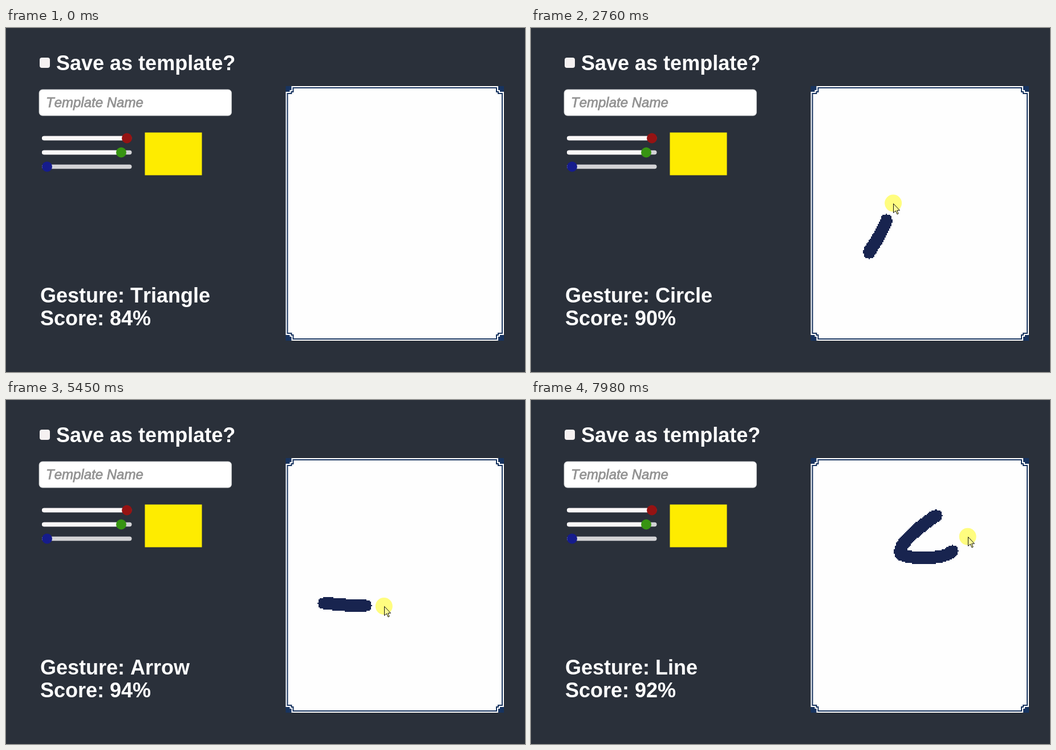
Write an HTML page with a canvas that moves like this. It is 910x604 px and loops after 8 s.

```html
<!DOCTYPE html>
<html lang="en">
<head>
<meta charset="utf-8">
<title>Gesture recognizer</title>
<style>
  html, body { margin: 0; width: 100%; height: 100%; overflow: hidden; background: #2a303a; }
  svg, canvas { position: absolute; left: 0; top: 0; }
  text { font: bold 36px "Liberation Sans", Arial, sans-serif; font-kerning: none; fill: #fff; }
  text.hint { font: italic 24px "Liberation Sans", Arial, sans-serif; font-kerning: none;
    fill: #929292; stroke: #929292; stroke-width: .8; }
</style>
</head>
<body>
<svg id="ui" width="910" height="604">
  <rect x="59" y="52" width="18" height="18" rx="4" fill="#f5f1f1"/>
  <text x="88" y="74">Save as template?</text>
  <rect x="58" y="108" width="337.5" height="46" rx="6" fill="#fff" stroke="#b9bbbe" stroke-width=".8"/>
  <text class="hint" x="70" y="139">Template Name</text>
  <rect x="243.5" y="183.5" width="100" height="75" fill="#feec00"/>
  <text id="gesture" x="60" y="482"></text>
  <text id="score" x="60" y="522"></text>
</svg>
<canvas id="pad" width="910" height="604"></canvas>
<script>
const LOOP = 8000, LAG = 40, TEXEL = 2, RADIUS = 5;
const NAVY = '#17335f', INK = [24, 36, 79];
const ui = document.getElementById('ui');
const ctx = document.getElementById('pad').getContext('2d');
const gestureText = document.getElementById('gesture');
const scoreText = document.getElementById('score');

function svgNode(tag, attrs) {
  const el = document.createElementNS(ui.namespaceURI, tag);
  for (const [k, v] of Object.entries(attrs)) el.setAttribute(k, v);
  return el;
}

function addRect(x, y, width, height, fill, rx = 0) {
  ui.append(svgNode('rect', { x, y, width, height, fill, rx }));
}

// Colour sliders
[[212, '#951313'], [202, '#379412'], [72, '#161c8c']].forEach(([x, color], i) => {
  const y = 193.5 + 25 * i;
  addRect(63, y - 3.7, 157.5, 7.4, '#d2d2d5', 3.7);
  addRect(63, y - 3.7, x - 63, 7.4, '#fbf8f8', 3.7);
  addRect(x - 9, y - 9, 18, 18, color, 9);
});

// Panel with notched corners: nested outlines, each inset by d
addRect(490.5, 102, 382.5, 447, NAVY);
[[0, '#fff'], [2, NAVY], [4, '#fefefe']].forEach(([d, color]) => {
  for (const [dx, dy] of [[0, 10], [7, 7], [10, 0]]) {
    addRect(490.5 + dx + d, 102 + dy + d, 382.5 - 2 * (dx + d), 447 - 2 * (dy + d), color);
  }
});

// A cursor run along an SVG path, kept as one point per pixel of length
function run(start, end, d, extra) {
  const path = svgNode('path', { d });
  const points = Array.from({ length: Math.floor(path.getTotalLength()) + 1 }, (_, i) => {
    const { x, y } = path.getPointAtLength(i);
    return [x, y];
  });
  return { start, end, points, ...extra };
}

const strokes = [
  run(770, 1460, 'M632 257Q557 300 517 380Q530 395 545 407L660 485Q700 512 740 512' +
    'C800 512 845 450 845 393C845 310 740 222 632 220Q620 220 614 234',
    { name: 'Circle', score: 90, color: [128, 98, 0], release: 1614 }),
  run(2560, 3340, 'M592 394Q624 350 642 285Q655 245 683 184Q722 240 729 272Q739 320 741 382H591',
    { name: 'Triangle', score: 83, color: [32, 192, 0], release: 3580 }),
  run(4080, 4650, 'M606 399L632 332L647 283Q658 222 672 217Q678 217 698 285L712 340L726 386',
    { name: 'Arrow', score: 94, color: [213, 237, 0], release: 4880 }),
  run(5260, 5620, 'M557 356Q600 362 652 362H752',
    { name: 'Line', score: 92, color: [0, 42, 117], release: 5850 }),
  run(7620, 8340, 'M710 203Q650 245 647 266Q647 277 690 277Q722 277 735 268' +
    'Q755 255 767 238Q840 130 640 140', { release: Infinity })
];

const runs = [
  ...strokes,
  run(110, 680, 'M868 554L632 257'),
  run(1790, 2150, 'M614 234L592 394'),
  run(3570, 3720, 'M591 382L629 407L606 399'),
  run(4880, 5220, 'M726 386Q800 370 557 356'),
  run(5860, 6110, 'M752 362L557 433L577 420'),
  run(6690, 7260, 'M577 420C660 330 850 100 710 203')
].sort((a, b) => a.start - b.start);

// How many points of a run are passed at time t
function passed(r, t) {
  const u = Math.min(1, Math.max(0, (t - r.start) / (r.end - r.start)));
  return Math.round((r.points.length - 1) * u * u * (3 - 2 * u));
}

function stamp([x, y]) {
  const cx = Math.floor(x / TEXEL), cy = Math.floor(y / TEXEL);
  for (let dy = -RADIUS; dy <= RADIUS; dy++) {
    const half = Math.floor(Math.sqrt(RADIUS * RADIUS - dy * dy));
    ctx.fillRect((cx - half) * TEXEL, (cy + dy) * TEXEL, (2 * half + 1) * TEXEL, TEXEL);
  }
}

// Ink while drawing; once recognized, the stroke's own colour fading to white
function drawStroke(s, t) {
  const age = t - s.release;
  const alpha = age < 0 ? 1 : 0.94 - age * 0.00243;
  if (t < s.start + LAG || alpha <= 0) return;
  const mix = (age < 0 ? INK : s.color).map(c => Math.round(254 + (c - 254) * alpha));
  ctx.fillStyle = `rgb(${mix})`;
  s.points.slice(0, passed(s, t - LAG) + 1).forEach(stamp);
}

const arrow = new Path2D('M.5 .5V16.5L4.3 13 7 19 9.2 18 6.7 12.2H11.5Z');

function drawCursor(t) {
  const current = runs.filter(r => t >= r.start).pop();
  if (!current) return;
  const [x, y] = current.points[passed(current, t)];
  const pressed = strokes.some(s => t >= s.start && t < s.release);
  if (pressed) {
    ctx.fillStyle = 'rgba(255,252,0,.5)';
    ctx.beginPath();
    ctx.arc(x, y, 15, 0, 7);
    ctx.fill();
  }
  ctx.save();
  ctx.translate(Math.round(x), Math.round(y));
  ctx.fillStyle = pressed ? '#ffff9c' : '#fff';
  ctx.fill(arrow);
  ctx.strokeStyle = '#111';
  ctx.stroke(arrow);
  ctx.restore();
}

function frame(now) {
  const t = now % LOOP;
  const result = strokes.filter(s => t >= s.release).pop() || { name: 'Triangle', score: 84 };
  gestureText.textContent = `Gesture: ${result.name}`;
  scoreText.textContent = `Score: ${result.score}%`;
  ctx.clearRect(0, 0, 910, 604);
  strokes.forEach(s => drawStroke(s, t));
  drawCursor(t);
  requestAnimationFrame(frame);
}
requestAnimationFrame(frame);
</script>
</body>
</html>
```
